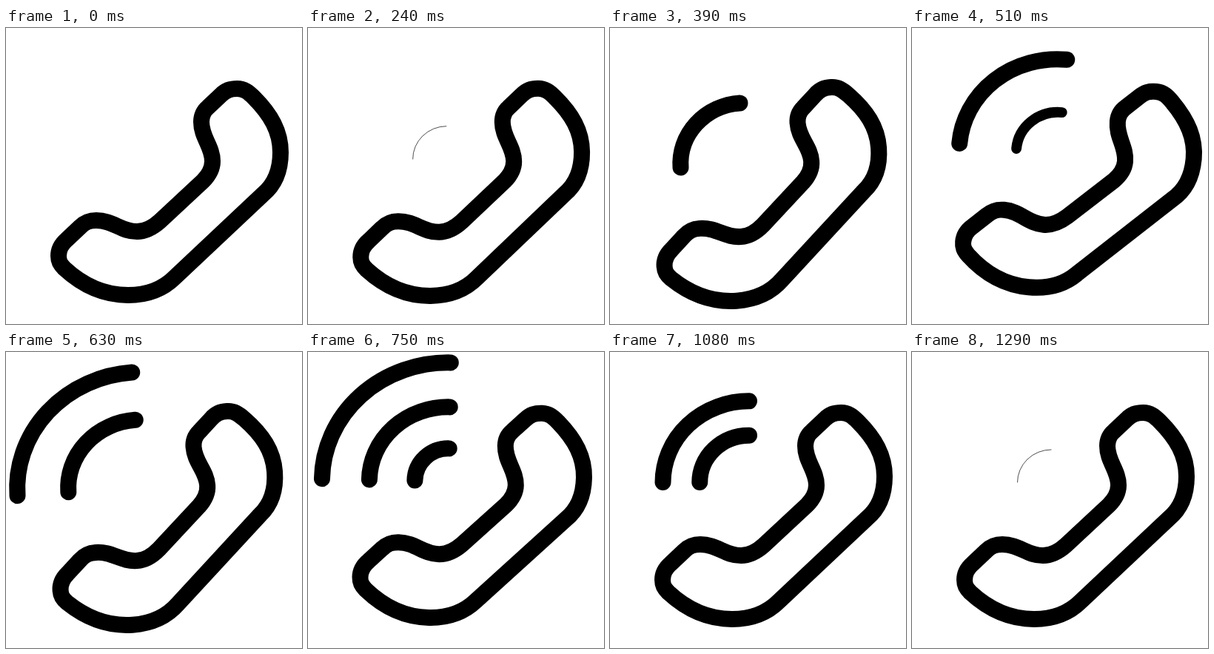
Write an HTML page that moves like this. It is 400x400 px and loops after 1320 ms.

```html
<!DOCTYPE html>
<html lang="en">
<head>
<meta charset="utf-8">
<title>Ringing phone</title>
<style>
  html, body { margin: 0; width: 100%; height: 100%; overflow: hidden; background: #fff; }
  svg { display: block; width: 100%; height: 100%; }
</style>
</head>
<body>
<svg viewBox="0 0 400 400">
  <g id="icon" fill="none" stroke="#000" stroke-width="22" stroke-linecap="round" stroke-linejoin="round">
    <path d="M228 337L347 225C364 211 371 191 371 168C371 140 358 117 335 94C328 87 322 82 312.5 82
      C303 82 297 84 290 91L273 107C266 113 264 119 264 127C264 148 279 160 279 180
      C279 190 274 199 266 207L208 261C198 270 189 275 177 275C155 275 145 260 122 260
      C113 260 107 262 100 269L82 286C75 292 71 299 71 308C71 315 73 319 79 325
      C105 349 134 361 165 361C190 361 212 353 228 337Z"/>
    <path class="wave"/>
    <path class="wave"/>
    <path class="wave"/>
  </g>
</svg>
<script>
const LOOP = 1320, STEP = 30, STROKE = 22, GROW = 95;
const icon = document.getElementById('icon');
const paths = document.querySelectorAll('.wave');

// Damped swing: [time, degrees]
const swing = [[225, 0], [335, -10.3], [470, 7.4], [612, -4.3], [735, 1.4], [780, 0]];

// Each wave leaves the inner radius, reaches rx/ry, then returns
const inner = { rx: 45.5, ry: 44 };
const waves = [
  { rx: 171, ry: 160, start: 237, out: 460, back: 900, end: 1293 },
  { rx: 107, ry: 100, start: 450, out: 256, back: 900, end: 1200 },
  { rx: 45.5, ry: 44, start: 650, out: 150, back: 900, end: 1040 }
];

const clamp = x => Math.min(1, Math.max(0, x));
const ease = x => (1 - Math.cos(Math.PI * clamp(x))) / 2;
const mix = (a, b, k) => a + (b - a) * k;

function angleAt(t) {
  const i = swing.findIndex(([time]) => time > t);
  if (i < 1) return 0;
  const [t0, a0] = swing[i - 1], [t1, a1] = swing[i];
  return mix(a0, a1, ease((t - t0) / (t1 - t0)));
}

function drawWave(path, w, t) {
  const width = STROKE * Math.min(clamp((t - w.start) / GROW), clamp((w.end - t) / GROW));
  const spread = t < w.back
    ? ease(clamp((t - w.start) / w.out) ** 0.87)
    : ease((w.end - t) / (w.end - w.back));
  const rx = mix(inner.rx, w.rx, spread), ry = mix(inner.ry, w.ry, spread);
  path.setAttribute('d', `M${188 - rx} 176A${rx} ${ry} 0 0 1 188 ${176 - ry}`);
  path.setAttribute('stroke-width', width);
  path.style.display = width > 0 ? '' : 'none';
}

function draw() {
  const t = Math.floor(performance.now() % LOOP / STEP) * STEP;
  icon.setAttribute('transform', `rotate(${angleAt(t)} 278 278)`);
  waves.forEach((w, i) => drawWave(paths[i], w, t));
  requestAnimationFrame(draw);
}
draw();
</script>
</body>
</html>
```
